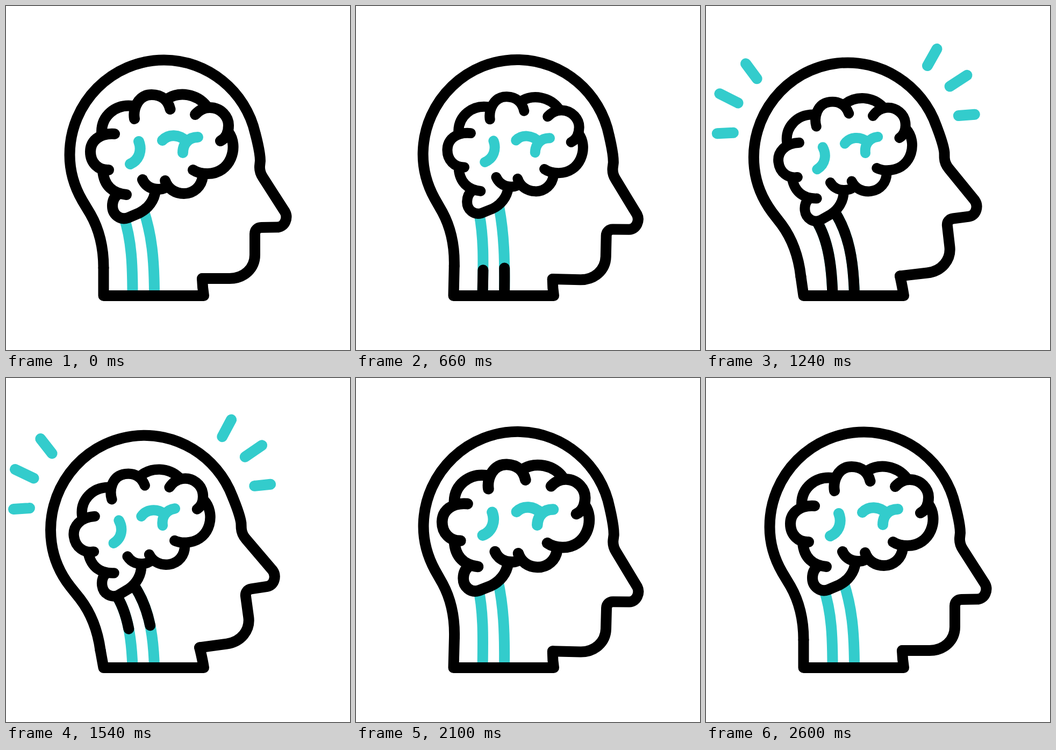
Write an HTML page that moves like this. It is 640 by 640 pixels and loops after 2860 ms.

```html
<!DOCTYPE html>
<html lang="en">
<head>
<meta charset="utf-8">
<title>Thinking head</title>
<style>
  html, body { margin: 0; width: 100%; height: 100%; overflow: hidden; background: #fff; }
  svg { display: block; width: 100%; height: 100%; }
  path { fill: none; stroke: #000; stroke-width: 20; stroke-linecap: round; stroke-linejoin: round; }
  .teal { stroke: #33cccc; }
  .tail { fill: #fff; }
</style>
</head>
<body>
<svg viewBox="0 0 640 640">
  <g id="nerves">
    <path class="teal"/><path class="teal"/>
    <path class="pulse" pathLength="1"/><path class="pulse" pathLength="1"/>
  </g>
  <path id="base"/>
  <g id="head">
    <path d="M181.5 487C181.5 446 173 415 157 387L142 362C127 336 118.5 308 118.5 277C118.5 180 197 100.5 294 100.5C375 100.5 446 158 464 238C468 254 473 272 473 288L472 298C471.5 306 474 313 478 319L519 383C525 394 519 411 505 411.5L475 412C468 412 463 417 463 424V463C463 488 443 507 416 507H365"/>
    <g id="brain">
      <path class="tail" d="M278 343C276 362 264 377 248 385L227 394C212 399 198 388 198 372C198 363 201 356 207 351"/>
      <path d="M178 234C178 205 203 182 236 186"/>
      <path d="M239 210C236 192 245 165 271 165C291 165 302 177 305.5 192"/>
      <path d="M301 172C323 159 355 163 373 186"/>
      <path d="M352 202C360 193 370 189 379 189C400 189 414 206 414 222C414 236 409 246 399 251"/>
      <path d="M414 235C434 262 418 312 375 312C363 312 354 309 348 305"/>
      <path d="M366 317C364 335 350 349 331 349C315 349 301 340 296 325"/>
      <path d="M254 323C260 336 272 341 284 341C291 341 297 338 300 334"/>
      <path d="M224 351C200 349 182 335 180 306"/>
      <path d="M191 305C172 306 157 292 157 271C157 252 173 236 202 238"/>
      <path class="teal" d="M247 252C253 267 249 286 231 294"/>
      <path class="teal" d="M291 250C302 238 322 238 336 252M357 244C340 244 329 256 329 273"/>
    </g>
    <g id="rays">
      <path class="teal" pathLength="1" d="M87 207L57 205"/>
      <path class="teal" pathLength="1" d="M102 153L70 132"/>
      <path class="teal" pathLength="1" d="M142 112L124.6 82"/>
      <path class="teal" pathLength="1" d="M460 124L481 95"/>
      <path class="teal" pathLength="1" d="M497 167L531 150"/>
      <path class="teal" pathLength="1" d="M507 223L537 224"/>
    </g>
  </g>
</svg>
<script>
const LOOP = 2860, PIVOT = [322, 540], MID = [290, 262];
const $ = s => document.querySelector(s);
const $$ = s => [...document.querySelectorAll(s)];
const head = $('#head'), brain = $('#brain'), base = $('#base');
const teal = $$('#nerves .teal'), pulse = $$('.pulse'), rays = $$('#rays path');

// keys as [time, value]
const lean = curve([[200, 0], [415, 5.7], [740, -.4], [920, -3.6], [1240, -6.5], [1500, -8],
  [1820, -.85], [1965, 3.9], [2100, 1.55], [2360, -3.7], [2600, 0]]);
const size = curve([[200, 1], [400, .94], [920, .96], [1240, .945], [1820, 1], [2100, 1.03], [2600, 1]]);
const sway = curve([[200, 0], [415, 24], [740, 5], [920, -4], [1240, -14], [1500, -17],
  [1820, 4], [1965, 14], [2100, 8], [2360, -6], [2600, 0]]);

// smooth curve through the keys, without overshoot
function curve(keys) {
  const n = keys.length;
  const rate = i => (keys[i + 1][1] - keys[i][1]) / (keys[i + 1][0] - keys[i][0]);
  const slope = keys.map((k, i) => {
    if (i === 0 || i === n - 1) return 0;
    const a = rate(i - 1), b = rate(i);
    return a * b > 0 ? 2 * a * b / (a + b) : 0;
  });
  return t => {
    if (t <= keys[0][0]) return keys[0][1];
    if (t >= keys[n - 1][0]) return keys[n - 1][1];
    const i = keys.findIndex(k => k[0] > t) - 1;
    const [t0, v0] = keys[i], [t1, v1] = keys[i + 1];
    const d = t1 - t0, u = (t - t0) / d, e = u * u * (3 - 2 * u);
    return v0 + (v1 - v0) * e
      + d * u * (1 - u) * (slope[i] * (1 - u) - slope[i + 1] * u);
  };
}

function ease(t, from, to) {
  const u = Math.min(1, Math.max(0, (t - from) / (to - from)));
  return u * u * (3 - 2 * u);
}

function turn(x, y, deg) {
  const a = deg * Math.PI / 180, c = Math.cos(a), s = Math.sin(a);
  const dx = x - PIVOT[0], dy = y - PIVOT[1];
  return [PIVOT[0] + dx * c - dy * s, PIVOT[1] + dx * s + dy * c];
}

function trim(path, start, end) {
  const shown = end - start > .001;
  path.style.display = shown ? '' : 'none';
  if (shown) path.setAttribute('stroke-dasharray', `0 ${start} ${end - start} 2`);
}

function nerve(x, y1, x2, y2, x3, y3, dx) {
  return `M${x} 539C${x + dx * .1} ${y1} ${x2 + dx * .45} ${y2} ${x3 + dx} ${y3 - dx * .5}`;
}

function draw(t) {
  const deg = lean(t), k = size(t), dx = sway(t);
  head.setAttribute('transform', `rotate(${deg} ${PIVOT})`);
  brain.setAttribute('transform',
    `translate(${MID}) scale(${k}) translate(${-MID[0]} ${-MID[1]})`);
  base.setAttribute('d',
    `M${turn(181.5, 487, deg)}L181.5 539H368Q365.5 523 ${turn(365, 507, deg)}`);

  [nerve(235.5, 485, 234, 435, 219, 392, dx), nerve(276, 470, 271, 425, 256, 380, dx)]
    .forEach((d, i) => {
      teal[i].setAttribute('d', d);
      pulse[i].setAttribute('d', d);
      trim(pulse[i], ease(t, 1300, 1780), ease(t, 460, 1000));
    });
  rays.forEach(r => trim(r, ease(t, 1640, 2040), ease(t, 740, 1040)));
}

function tick() {
  draw(performance.now() % LOOP);
  requestAnimationFrame(tick);
}
tick();
</script>
</body>
</html>
```
